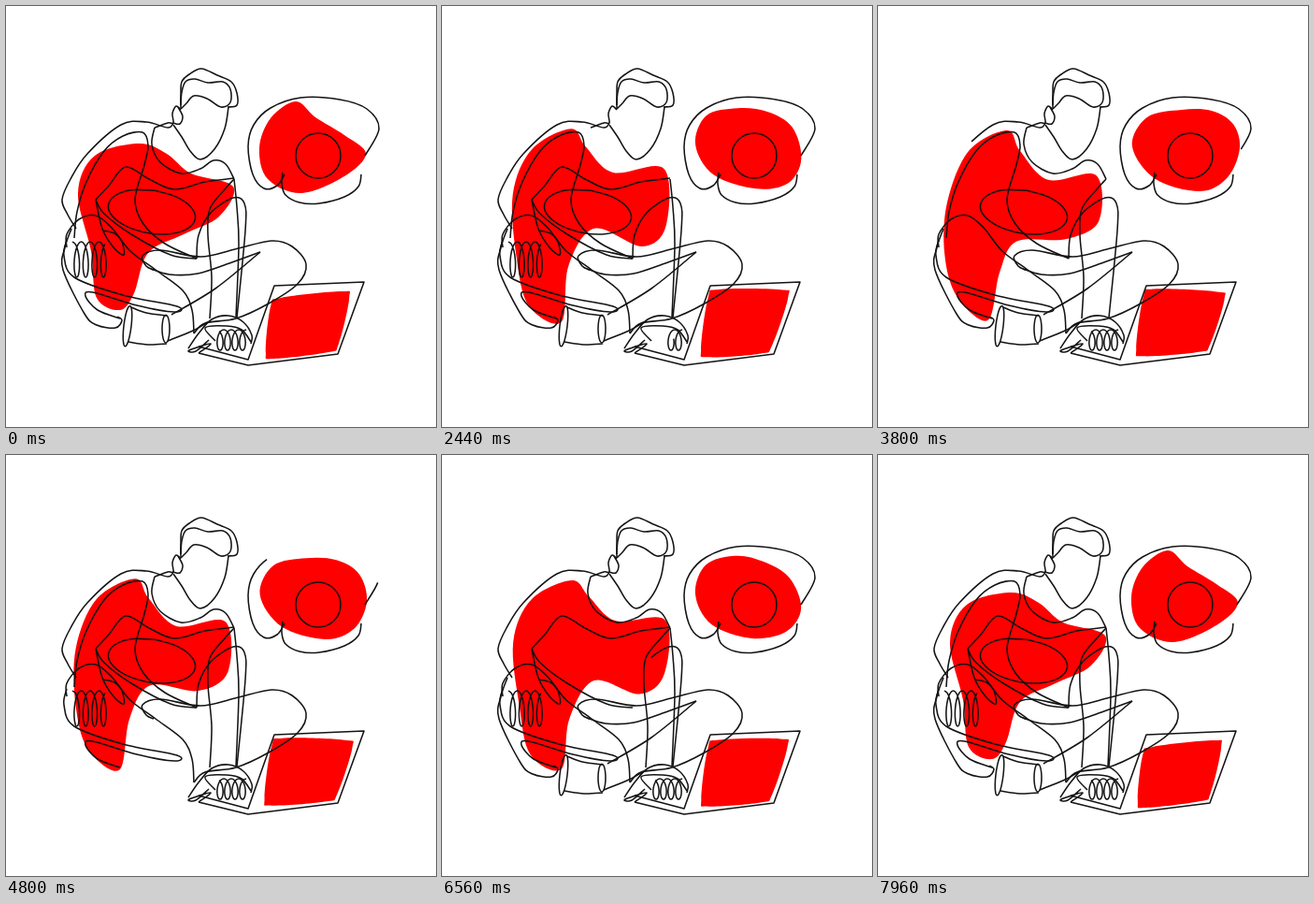
An HTML page for the animation above (8 s loop, 460 by 450 pixels).

```html
<!DOCTYPE html>
<html lang="en">
<head>
<meta charset="utf-8">
<title>Line drawing</title>
<style>
html, body { margin: 0; width: 100%; height: 100%; overflow: hidden; background: #fff; }
svg { display: block; width: 460px; height: 450px; }
.blob { fill: #f00; }
.line { fill: none; stroke: #141414; stroke-width: 1.55; stroke-linejoin: round; }
</style>
</head>
<body>
<svg id="stage" viewBox="0 0 460 450"></svg>
<script>
const LOOP = 8000;
const POSE = LOOP / 4;   // time from one blob pose to the next
const LAG = 950;         // redrawing follows erasing after this delay
const PACE = 0.6;        // redrawing takes this share of the erasing time

const stage = document.getElementById('stage');
const clamp = v => Math.max(0, Math.min(1, v));
const mix = (a, b, s) => a.map((v, i) => v + (b[i] - v) * s);

function add(tag, attrs) {
  const node = document.createElementNS('http://www.w3.org/2000/svg', tag);
  for (const name in attrs) node.setAttribute(name, attrs[name]);
  return stage.appendChild(node);
}

function points(text) {
  const v = text.split(' ').map(Number);
  return Array.from({ length: v.length / 2 }, (_, i) => [v[2 * i], v[2 * i + 1]]);
}

// Smooth curve through points.
function curve(list, closed) {
  const n = list.length;
  const at = i => list[closed ? (i + n) % n : Math.max(0, Math.min(n - 1, i))];
  let d = 'M' + at(0);
  for (let i = 0; i < (closed ? n : n - 1); i++) {
    const [a, b, c, e] = [at(i - 1), at(i), at(i + 1), at(i + 2)];
    const out = b.map((q, k) => q + (c[k] - a[k]) / 6);
    const into = c.map((q, k) => q - (e[k] - b[k]) / 6);
    d += `C${out} ${into} ${c}`;
  }
  return d + (closed ? 'Z' : '');
}

const smooth = text => curve(points(text));
const straight = text => 'M' + points(text).join('L');

// Ellipse turning in place, or a row of loops when it has a pitch.
function coil(x, y, rx, ry, { turns = 1, pitch = 0, tilt = 0 } = {}) {
  const list = [];
  for (let u = 0; u <= turns; u += 1 / 12) {
    const px = rx * Math.sin(u * 2 * Math.PI), py = -ry * Math.cos(u * 2 * Math.PI);
    list.push([x + pitch * u + px * Math.cos(tilt) - py * Math.sin(tilt),
      y + px * Math.sin(tilt) + py * Math.cos(tilt)]);
  }
  return curve(list);
}

// Each corner becomes two points on its sides.
const rounded = corners => corners.flatMap((c, i) =>
  [corners.at(i - 1), corners[(i + 1) % corners.length]].map(side => mix(c, side, 0.12)));

const blobs = [];
function blob(first, middle, last, shape = list => list) {
  const poses = [first, middle, last, middle].map(text => shape(points(text)));
  blobs.push({ node: add('path', { class: 'blob' }), poses });
}

const lines = [];
const still = (...paths) => paths.map(d => add('path', { class: 'line', d, pathLength: 1 }));
const moving = (begin, span, ...paths) =>
  lines.push(...still(...paths).map(node => ({ node, begin, span })));

// shirt, speech and screen colour
blob('142 147 172 158 198 179 243 193 228 225 190 244 152 264 137 307 122 325 97 312 91 262 77 200 95 160',
  '138 131 154 150 183 177 238 173 240 236 216 258 165 236 136 277 129 338 94 322 81 270 76 200 96 153',
  '138 133 152 155 182 186 233 181 236 230 200 249 148 252 130 285 117 336 84 310 71 265 74 210 97 155');
blob('310 102 331 119 362 138 385 158 362 182 316 200 280 185 271 152 283 120',
  '315 109 347 113 374 130 384 165 370 190 335 195 290 180 271 148 282 117',
  '325 111 357 112 380 126 387 152 374 183 345 198 297 185 272 150 288 119');
blob('284 313 369 304 354 369 277 378', '286 303 373 303 350 371 276 376',
  '285 302 373 306 353 369 275 375', rounded);

// laptop
moving(100, 2150, straight('206 364 259 378 287 299 383 295 355 372 259 384 206 371'));

// right hand
still(smooth('206 371 219 361 201 366 195 369 203 369 217 357'),
  smooth('262 361 263 352 254 338 238 331 220 335 206 350 195 366'),
  smooth('262 359 252 346 236 342 213 344 224 358'));
moving(1330, 600, coil(257, 357, -5, 11, { turns: 4, pitch: -8 }));

// right arm
moving(1900, 500, smooth('218 334 220 290 216 245 218 217 234 196 244 185'));
moving(3000, 600, smooth('244 185 247 215 249 255 246 333'));
moving(6400, 600, smooth('204 270 206 245 219 221 243 205 255 211 256 240 247 333'));

// ear and collar
still(smooth('187 111 182 107 178 115 179 125 173 125 159 130'));
moving(1900, 450,
  smooth('179 125 186 126 189 118 184 108'),
  smooth('159 130 156 148 165 167 187 179 208 174 222 165 235 169 244 185'));

// head
moving(2450, 500,
  smooth('187 110 187 95 188 81 196 73 209 67 226 74 241 81 247 93 247 106 237 108'),
  smooth('187 106 188 92 192 81 202 78 216 82 232 81 240 89 240 103 230 108 215 99 201 96 193 104 187 110'),
  smooth('179 127 188 140 197 155 208 164 223 153 234 131 238 108'));

// shoulder
moving(2690, 600, smooth('179 125 173 130 150 124 123 127 87 158 69 185 60 207 66 223 75 238'));

// left arm and hand
still(smooth('65 258 65 244 78 228 96 224 113 237 133 262 160 282 189 304 199 325 201 350'));
moving(3000, 700,
  smooth('96 207 110 192 128 172 153 185 180 196 213 188 244 184'),
  smooth('96 207 105 222 134 244 176 266 204 270'),
  smooth('96 207 103 238 115 258 126 266 124 252 116 243 104 240'),
  coil(71, 271, 5, 19, { turns: 4, pitch: 9.5 }));

// hip, foot and shin
still(smooth('65 250 62 267 73 290 125 309 183 321 180 327 140 320 93 306 85 310 98 325 122 334'),
  smooth('201 350 213 339 246 334 281 318 312 297 321 276 306 257 284 251 245 260 208 268 165 261 146 267 150 278 158 282'));
moving(4000, 700,
  smooth('70 238 63 258 61 282 84 329 97 341 117 344 124 336 119 332'),
  smooth('155 281 175 287 205 286 239 275 272 263'),
  smooth('272 263 224 302 177 330'),
  smooth('173 358 200 347 216 338'),
  smooth('131 359 152 362 172 361'),
  smooth('134 322 150 328 172 331'),
  coil(171, 345, 4, 15),
  coil(130, 342, 4, 22, { tilt: 0.12 }));

// chest and sleeve
moving(5750, 700,
  coil(156, 220, 47, 23, { tilt: 0.16 }),
  smooth('73 248 76 220 86 188 105 155 125 139 146 135 152 149 148 170 138 207 147 233 170 254 204 270'));

// speech outline with a plain mark
moving(0, 2350, smooth('296 178 295 190 299 202 314 210 335 211 362 204 377 193 380 180'));
moving(3750, 1820,
  smooth('384 160 399 131 386 110 357 100 315 98 283 109 265 127 259 150 264 180 276 195 290 192 298 180'));
add('circle', { class: 'line', cx: 334, cy: 160, r: 24 });

function draw(t) {
  const step = Math.floor(t / POSE);
  const ease = (1 - Math.cos(Math.PI * (t / POSE - step))) / 2;
  for (const { node, poses } of blobs) {
    const next = poses[(step + 1) % poses.length];
    node.setAttribute('d', curve(poses[step].map((p, i) => mix(p, next[i], ease)), true));
  }
  for (const { node, begin, span } of lines) {
    const front = clamp((t - begin) / span);
    const tail = clamp((t - begin - LAG) / (span * PACE));
    node.setAttribute('stroke-dasharray', front > tail ? `${tail} ${front - tail} 2 0` : 'none');
  }
}

const start = performance.now();
function tick() {
  draw((performance.now() - start) % LOOP);
  requestAnimationFrame(tick);
}
tick();
</script>
</body>
</html>
```
